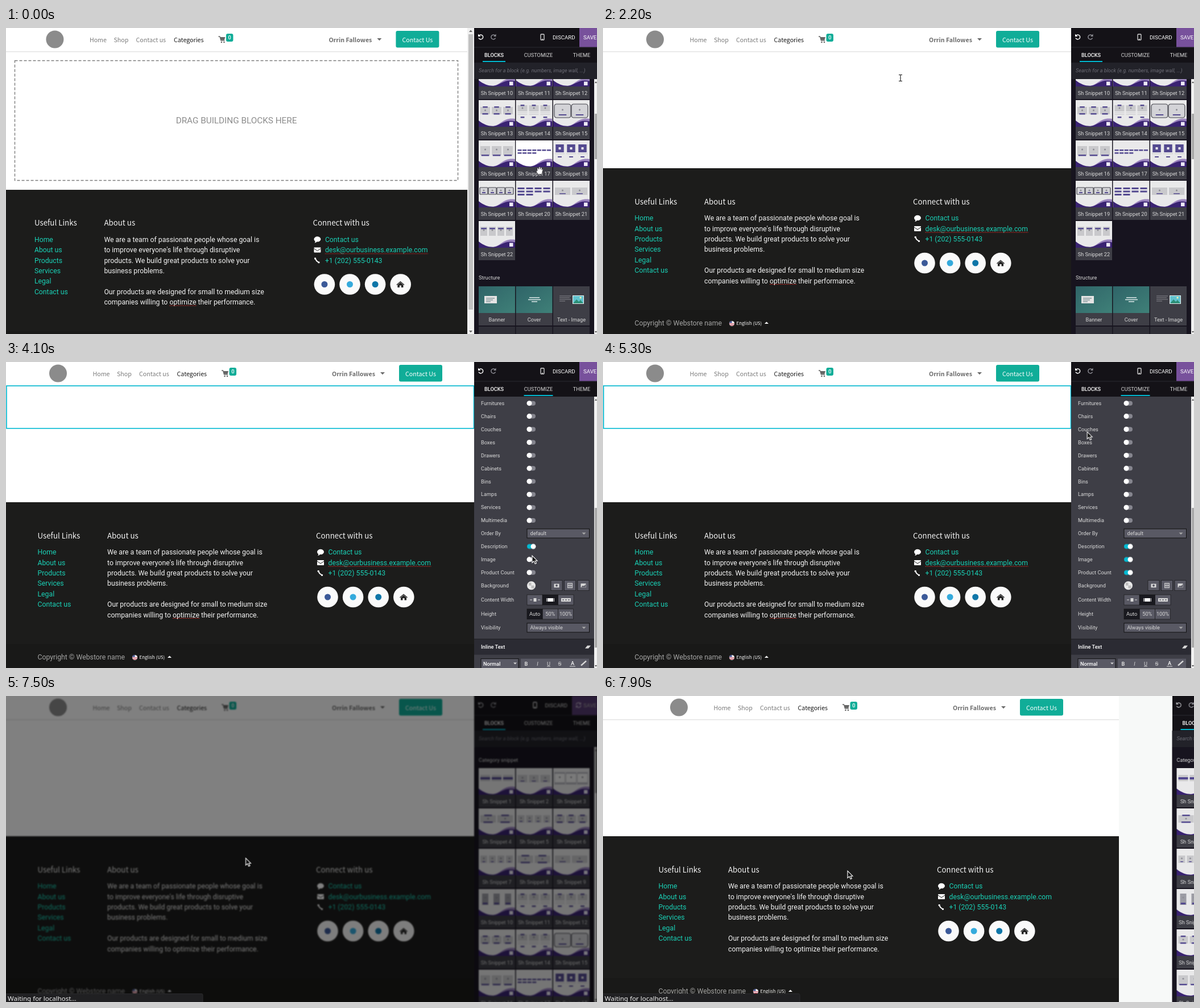
Animation, 1039 px wide and 539 px high, one loop 8 s. Source, as an HTML page:

```html
<!DOCTYPE html>
<html lang="en">
<head>
<meta charset="utf-8">
<title>Website builder</title>
<style>
html, body { margin: 0; width: 100%; height: 100%; overflow: hidden; background: #f7f9f8; }
svg { display: block; width: 1039px; height: 539px; font: 9.2px Roboto, sans-serif; fill: #d9d9d9; }
text { white-space: pre; }
.nav, .head, .lang { font-family: 'Noto Sans CJK SC', 'Noto Sans CJK JP', 'Noto Sans', sans-serif; }
.nav { font-size: 10.66px; fill: #7c7c7c; }
.user { font-weight: 700; fill: #6c6c6c; }
.dark { fill: #1a1a1a; }
.white { fill: #fff; }
.head { font-size: 13.3px; fill: #f4f4f4; }
.lang { font-size: 8px; font-weight: 500; fill: #fff; }
.copy { font-size: 12.26px; fill: #f4f4f4; }
.link { fill: #1ad0b6; }
.soft { fill: #a5a5a4; }
.drop { font-size: 15.3px; fill: #8c8c8c; }
.mid { text-anchor: middle; }
.end { text-anchor: end; }
.bold { font-weight: 500; fill: #fff; }
.top { font-size: 9.7px; }
.hint { font-size: 9.1px; font-style: italic; fill: #6d6d76; }
.mono { font-family: 'Noto Sans Mono', monospace; font-size: 9px; }
.unit { fill: #9a9aa2; }
.status { font: 11.5px 'Noto Sans', sans-serif; fill: #f0f0f0; }

.move { animation: 8s step-end infinite; }
#cursor { animation-name: cursor; }
#ghost { animation-name: ghost; }
#shift { animation-name: shift; }
#footer { animation-name: footer; }
#list { animation-name: list; }
#options { animation-name: options; }
#grip { animation-name: grip; }
#grip2 { animation-name: grip2; }
#panel { animation-name: panel; }
#scene { animation-name: dim; }
#spin { animation: spin 1s steps(10) infinite; }

@keyframes cursor {
  0% { transform: translate(938px, 251px); animation-timing-function: steps(2); }
  2.5%, 6.25% { transform: translate(950px, 265px); }
  7.5% { transform: translate(967px, 275px); }
  8.75% { transform: translate(930px, 300px); }
  10% { transform: translate(858px, 326px); }
  11.25% { transform: translate(907px, 312px); }
  15% { transform: translate(907px, 300px); animation-timing-function: steps(3); }
  18.75% { transform: translate(523px, 88px); }
  27.5% { transform: translate(523px, 88px); animation-timing-function: steps(7); }
  36.25% { transform: translate(1003px, 260px); }
  37.5% { transform: translate(1003px, 260px); animation-timing-function: steps(4); }
  42.5% { transform: translate(964px, 347px); }
  43.75% { transform: translate(964px, 347px); animation-timing-function: steps(4); }
  48.75% { transform: translate(921px, 328px); }
  51.25% { transform: translate(925px, 341px); animation-timing-function: steps(5); }
  57.5% { transform: translate(924px, 366px); }
  58.75% { transform: translate(924px, 366px); animation-timing-function: steps(4); }
  63.75% { transform: translate(760px, 190px); animation-timing-function: steps(5); }
  70% { transform: translate(988px, 22px); }
  71.25% { transform: translate(988px, 22px); animation-timing-function: steps(4); }
  76.25% { transform: translate(993px, 68px); }
  81.25% { transform: translate(993px, 68px); animation-timing-function: steps(9); }
  92.5% { transform: translate(421.5px, 285.5px); }
  96.25% { transform: translate(421.5px, 285.5px); animation-timing-function: steps(2); }
  98.75%, 100% { transform: translate(430px, 308px); }
}
@keyframes ghost {
  0%, 23.75%, 100% { opacity: 0; }
  15% { opacity: 1; }
  21.25% { opacity: .7; }
  22.5% { opacity: .35; }
}
@keyframes shift {
  0% { transform: translateX(-5.6px); }
  15% { transform: none; }
  97.5% { transform: translateX(15px); }
  98.75%, 100% { transform: translateX(42px); }
}
@keyframes footer { 0% { transform: translateY(37.5px); } 15%, 100% { transform: none; } }
@keyframes list { 0% { transform: translateY(-284px); } 93.75%, 100% { transform: none; } }
@keyframes options {
  0%, 37.5% { transform: none; animation-timing-function: steps(4); }
  42.5%, 100% { transform: translateY(-356.4px); }
}
@keyframes grip { 0% { transform: translateY(60px); } 93.75%, 100% { transform: none; } }
@keyframes grip2 {
  0%, 37.5% { transform: none; animation-timing-function: steps(4); }
  42.5%, 100% { transform: translateY(182px); }
}
@keyframes panel {
  0% { transform: none; }
  97.5% { transform: translateX(97px); }
  98.75%, 100% { transform: translateX(177.5px); }
}
@keyframes dim {
  0%, 96.25%, 100% { filter: none; }
  93.75% { filter: blur(1px) brightness(.5); }
}
@keyframes spin { to { transform: rotate(360deg); } }
</style>
</head>
<body>
<svg id="stage" viewBox="0 0 1039 539"></svg>
<script>
const TEAL = '#01bad2', GREEN = '#10ad98', PURPLE = '#544a90', GREY = '#c9c9cc', LINE = '#d9d9d9';

const text = (x, y, s, c = '') => `<text x="${x}" y="${y}" class="${c}">${s}</text>`;
const rect = (x, y, w, h, fill, more = '') =>
  `<rect x="${x}" y="${y}" width="${w}" height="${h}" fill="${fill}" ${more}/>`;
const disc = (x, y, r, fill) => `<circle cx="${x}" cy="${y}" r="${r}" fill="${fill}"/>`;
const path = (d, fill, more = '') => `<path d="${d}" fill="${fill}" ${more}/>`;
const line = (d, color = LINE, w = 1, more = '') =>
  path(d, 'none', `stroke="${color}" stroke-width="${w}" ${more}`);
const at = (x, y, s) => `<g transform="translate(${x} ${y})">${s}</g>`;
const move = (id, s) => `<g id="${id}" class="move">${s}</g>`;
const range = (n, fn) => Array.from({ length: n }, (_, i) => fn(i)).join('');

// Groups shown only during the given [from, to] spans, in ms.
let css = '';
function during(id, spans, s) {
  const keys = spans.map(([a, b]) => `${a / 80}%{opacity:1}${b / 80}%{opacity:0}`).join('');
  css += `@keyframes on-${id}{0%,100%{opacity:0}${keys}}#${id}{animation-name:on-${id}}`;
  return move(id, s);
}

/* ---------- web page ---------- */
function header() {
  const cart = line('M379 15h2.5l2 7h6.5', '#666', 1.3) + path('M382 16h9l-1.5 5h-6.5z', '#666') +
    disc(384.5, 25, 1.3, '#666') + disc(389, 25, 1.3, '#666');
  return rect(-60, -10, 925, 52, '#fff') + rect(-60, 41, 925, 1, '#e2e2e2') + rect(-60, 42, 925, 1, '#f4f4f4') +
    disc(91.5, 20, 15.5, '#8b8b8b') +
    text(152.5, 24.5, 'Home', 'nav') + text(195, 24.5, 'Shop', 'nav') +
    text(234, 24.5, 'Contact us', 'nav') + text(300.5, 24.5, 'Categories', 'nav dark') + cart +
    rect(392.5, 10, 12.5, 14, GREEN, 'rx="3"') + text(398.8, 20.3, '0', 'mid bold') +
    text(573, 24.5, 'Orrin Fallowes', 'nav user') + path('M658 18h8l-4 4.2z', '#6c6c6c') +
    rect(691, 5, 76, 29.5, GREEN, 'rx="3"') + text(729, 24.5, 'Contact Us', 'nav white mid');
}

function footer() {
  const row = i => 339.4 + 18.35 * i;
  const links = ['Home', 'About us', 'Products', 'Services', 'Legal', 'Contact us'];
  const about = ['We are a team of passionate people whose goal is', "to improve everyone's life through disruptive",
    'products. We build great products to solve your', 'business problems.', '',
    'Our products are designed for small to medium size', 'companies willing to optimize their performance.'];
  const contact = ['Contact us', 'desk@ourbusiness.example.com', '+1 (202) 555-0143'];
  const icons = path('M547 334.5a6 4.6 0 1 1 5 4.5q-1.5 2-4 2 1.5-1 1.2-2.7q-2.2-1.5-2.2-3.8z', '#fff') +
    rect(547, 349, 12, 9, '#fff', 'rx="1"') + line('M547 351l6 4 6-4', '#1c1c1b') +
    line('M549.5 367.5q.5 6 7 8', '#fff', 2) + line('M549 367v3M554 375.5h3', '#fff', 2.5);
  const colors = ['#3b5998', '#35aadc', '#0e76a8'];
  const house = path('M692 414.5l7-6 7 6-.8 1-6.2-5.3-6.2 5.3z', '#222') +
    path('M694 415l5-4.2 5 4.2v4.5h-3.5v-3.5h-3v3.5h-3.5z', '#222');
  const flag = disc(226.5, 520.5, 4.6, '#eee') + path('M222 519.5a4.6 4.6 0 0 1 4.5-3.6v3.6z', '#3a4a8c') +
    line('M222 521h9M223.5 523.5h6', '#c8324a', 1.2);
  return rect(-60, 247, 925, 302, '#1c1c1b') + rect(-60, 497, 925, 52, '#191918') +
    text(55.5, 310.5, 'Useful Links', 'head') + text(178, 310.5, 'About us', 'head') +
    text(545, 310.5, 'Connect with us', 'head') +
    links.map((s, i) => text(55.5, row(i), s, 'copy link')).join('') +
    about.map((s, i) => text(178, row(i), s, 'copy')).join('') +
    contact.map((s, i) => text(566.5, row(i), s, 'copy link')).join('') + icons +
    during('spell', [[0, 5700]], line('M566.5 360h181M293 451.5h47', '#c9302c', 1.2, 'stroke-dasharray="2 1"')) +
    range(4, i => disc(565.5 + 44.6 * i, 414, 18.3, '#fafafa')) +
    colors.map((c, i) => disc(565.5 + 44.6 * i, 414, 5.5, c)).join('') + house +
    text(55.5, 524, 'Copyright © Webstore name', 'copy soft') + flag +
    text(234.5, 523, 'English (US)', 'lang') + path('M284 521h7l-3.5-3.5z', '#fff');
}

function page() {
  const empty = rect(15.5, 57.5, 779, 211, 'none', 'stroke="#7d7d7d" stroke-width="1.4" stroke-dasharray="5 3"') +
    text(405, 168, 'DRAG BUILDING BLOCKS HERE', 'drop mid');
  const bar = rect(811, 0, 12, 539, '#f1f1f1') + rect(813, 11, 8, 485, '#c1c1c1') +
    path('M814 7h6l-3-3.5z', '#666') + path('M814 533h6l-3 3.5z', '#666');
  const tools = rect(391, 21, 41, 21, '#2b2b33', 'rx="2"') +
    line('M398 31.5h9M402.5 27v9M417 29h8M418.5 30v6h5v-6M420 27.5h2', '#fff', 1.2);
  return move('shift', rect(-60, 42, 925, 260, '#fff') + move('footer', footer()) + header()) +
    during('empty', [[0, 1200]], empty + bar) +
    during('section', [[2400, 5700]], rect(1, 42, 821.5, 75, 'none', `stroke="${TEAL}" stroke-width="1.6"`)) +
    during('tools', [[2400, 2700], [5000, 5300]], tools);
}

/* ---------- block list ---------- */
// One letter for the look and one digit for the number of columns.
const LOOKS = 'b3 c3 w3 d2 c4 d3 c4 d2 c2 t3 g3 g3 d3 g3 f2 k3 r7 p3 f4 m4 c2 k4'.split(' ');

function item(look, n, x, w) {
  const card = (y, h, fill = GREY) => rect(x, y, w, h, fill);
  const bar = (y, part = .6, h = 3) => rect(x + w * (1 - part) / 2, y, w * part, h, PURPLE);
  const spot = y => disc(x + w / 2, y, 1.5, '#8c8c94');
  switch (look) {
    case 'b': return card(12, 11) + bar(16, 1, 4);
    case 'c': return card(12, 13) + spot(17) + bar(22, .4, 1.5);
    case 'w': return rect(x - 1, 7, w + 2, 22, '#b9b9bf') + card(10, 15, '#f4f4f4') + spot(16);
    case 'd': return card(12, 13) + spot(18) + bar(11, .5, 2.5) + bar(23, .6, 2.5);
    case 't': return rect(x + 3, 8, w - 6, 20, '#9c9ca4') + spot(15) + bar(24, .5);
    case 'g': return card(9, 11) + spot(14) + bar(8, .4, 2.5) + card(22, 1) + card(25, 1) + bar(29, .4, 2.5);
    case 'f': return rect(x - 1, n > 2 ? 12 : 7, w + 2, n > 2 ? 12 : 24, '#d3d3d7',
      `rx="${n > 2 ? 1 : 4}" stroke="#45454d" stroke-width="1.2"`) + spot(17) + bar(n > 2 ? 20 : 25, .5, 2);
    case 'k': return card(10, 16) + spot(16) + bar(n > 3 ? 12 : 25, .8, 2.5);
    case 'r': return bar(16, 1, 2.5) + (x < 32 ? bar(21, 1, 2.5) : '');
    case 'p': return bar(7, .85, 14) + rect(x + w / 2 - 2, 12, 4, 4, '#eee') + card(23, 1) + bar(28, .4, 2);
    case 'm': return bar(12, 1) + bar(17.5, 1) + (x < 32 ? bar(23, 1) : '');
  }
}

function snippet(n, x, y, glow = '') {
  const [look, cols] = LOOKS[n - 1], step = 60 / cols;
  const art = range(+cols, i => item(look, +cols, 3 + i * step, step - (cols > 4 ? 1.5 : 3)));
  const wave = path('M26 46C40 43 44 30 64 33V47z', '#9a84bd') +
    path('M0 36C10 44 19 46.5 28 45.5S46 33 64 37.5V47H0z', '#3a2372');
  return at(x, y, rect(0, 0, 64, 47, '#e9e9ea') + glow + art + wave + rect(54, 38.5, 6.5, 6.5, '#eeeaf6') +
    rect(0, 47, 64, 22, '#3e3e46') + text(32, 61.5, 'Sh Snippet ' + n, 'mid'));
}

const column = i => 831 + 65.5 * i;

function blocks() {
  const hover = { 17: [0, 700], 20: [900, 1200] };
  const glow = n => hover[n] ? during('glow' + n, [hover[n]], rect(0, 0, 64, 47, '#fff')) : '';
  const label = (i, s) => rect(column(i), 786, 64, 22, '#3e3e46') + text(column(i) + 32, 800.8, s, 'mid');
  const lead = rect(841, 756, 22, 13, '#e4e4e4') + line('M844 760h15M844 763h12M844 766h8', '#56757a');
  const cover = line('M920 759h18M918 762.5h22M924 766h10', '#dfeaea', 1.4);
  const pair = line('M973 756h20M973 759h18M973 762h20M973 765h10', '#85858c') +
    rect(996, 755, 20, 15, '#e9f0f0') + rect(997, 756, 18, 13, '#62c3cf') +
    path('M997 769l6-7 4 4 3-3 5 6z', '#2c8f77') + disc(1010, 759, 1.6, '#fff4b0');
  return text(831, 115.5, 'Category snippet') +
    range(22, i => snippet(i + 1, column(i % 3), 127 + 71 * Math.floor(i / 3), glow(i + 1))) +
    text(831, 727.3, 'Structure') +
    range(3, i => rect(column(i), 739, 64, 47, i < 2 ? 'url(#sea)' : '#3e3e46') + rect(column(i), 810, 64, 40, '#2f2f37')) +
    lead + cover + pair + label(0, 'Banner') + label(1, 'Cover') + label(2, 'Text - Image');
}

/* ---------- options ---------- */
const select = (y, s) => rect(916, y - 8, 109.5, 16, '#595964', 'stroke="#111"') +
  text(921.5, y + 3.3, s) + path(`M1012.5 ${y - 1.5}h7l-3.5 3.5z`, '#aaa');
const number = (y, v) => rect(916, y - 8, 45.5, 16, '#2b2b33', 'stroke="#0a0a0a"') +
  text(943.5, y + 3.3, v, 'mono end') + text(947, y + 3.3, 'px', 'mono unit');
const toggle = (y, on) => rect(916, y - 4, 15, 8, on ? TEAL : '#85858e', 'rx="4"') + disc(on ? 927 : 920, y, 4.5, '#fff');
const button = (x, y, w, on) => rect(x, y - 9, w, 18, on ? '#19191f' : '#595964', 'stroke="#111" stroke-width=".6"');

function options() {
  const rowY = i => 131 + 22.93 * i;
  const names = ['Animation', 'Margin Top', 'Margin Right', 'Margin Bottom', 'Margin Left', 'Padding Top', 'Padding Right',
    'Padding Bottom', 'Padding Left', 'Box Shadow', 'Box Shadow Hov…', 'Desks', 'Components', 'Furnitures', 'Chairs',
    'Couches', 'Boxes', 'Drawers', 'Cabinets', 'Bins', 'Lamps', 'Services', 'Multimedia', 'Order By', 'Description',
    'Image', 'Product Count', 'Background'];
  const values = { 1: 0, 5: 50, 6: 0 };
  const control = i => {
    const y = rowY(i);
    if (i === 23) return select(y, 'default');
    if (i === 0 || i === 9 || i === 10) return select(y, 'None');
    if (i < 9) return number(y, values[i] ?? '');
    return i < 27 ? toggle(y) : '';
  };
  const bar = (y, h) => rect(823, y, 211, h, '#2b2b33') + rect(823, y - 1, 211, 1, '#17171c');
  const tools = line('M937 106l3-3M941 104l3-3M938 103l4 3', LINE, 1.6) +
    line('M955.5 101h6.5l1.5 1.5v6h-8zM957.5 101v2.5h3.5M957.5 108v-2.5h4', LINE) +
    rect(974.5, 100, 5.5, 9.5, 'none', `stroke="${LINE}" rx="1"`) +
    line('M993 100h6v6h-6zM995.5 108.5h6v-6', '#aaa') + line('M1013.5 102h8M1016 100.5h3', LINE, 1.2) +
    path('M1014.5 103.5h6v6h-6z', LINE);
  const by = rowY(27), cw = 775.4, ht = 800.4, tb = 887;
  const back = disc(923.5, by, 7.5, '#e9e9e9') + path(`M919 ${by - 5}h4.5v5h5v5h-5v-5h-4.5z`, '#bdbdbd') +
    [968, 991.5, 1015].map(x => button(x - 10, by, 20)).join('') +
    rect(963.5, by - 3, 9, 6.5, LINE) + disc(968, by, 2, '#595964') +
    rect(987.5, by - 4, 8, 8, 'none', `stroke="${LINE}"`) + line(`M990 ${by - 4}v8M993 ${by - 4}v8M987 ${by}h8`) +
    rect(1010.5, by - 3.5, 9, 7, LINE) + path(`M1011 ${by + 3}l3-3 2 1 3-3v5z`, '#595964');
  const width = [916, 943, 970.5].map((x, i) => button(x, cw, 27.5, i === 1)).join('') +
    rect(927.5, cw - 3, 5, 6, LINE) + line(`M921 ${cw}h4M935 ${cw}h4`) +
    rect(952, cw - 3, 10, 6, '#fff') + line(`M950.5 ${cw - 3}v6M963.5 ${cw - 3}v6`) +
    rect(976, cw - 3, 17, 6, LINE) + line(`M978 ${cw}h13`, '#595964', 1.4, 'stroke-dasharray="3 2"');
  const height = ['Auto', '50%', '100%'].map((s, i) =>
    button(916 + 27.2 * i, ht, 27.2, !i) + text(929.6 + 27.2 * i, ht + 3.3, s, 'mid')).join('');
  const format = rect(835, tb - 8, 66, 20, '#595964', 'stroke="#111"') + text(839, tb + 4, 'Normal', 'bold') +
    path(`M892 ${tb - 1}h6l-3 3z`, LINE) + rect(905, tb - 8, 120, 20, '#595964') +
    text(914.5, tb + 4, '<tspan font-weight="700">B</tspan>', 'mid') +
    text(934.5, tb + 4, '<tspan font-style="italic">I</tspan>', 'mid') +
    text(954, tb + 4, '<tspan text-decoration="underline">U</tspan>', 'mid') +
    text(973.5, tb + 4, '<tspan text-decoration="line-through">S</tspan>', 'mid') +
    text(996, tb + 3, 'A', 'mid bold') + line(`M991 ${tb + 5.5}h10`) + line(`M1011 ${tb + 4}l9-8`, LINE, 2.5);
  const switched = (i, ms) => during('opt' + i, [[ms, 8000]], rect(915, rowY(i) - 5, 17, 10, '#3e3e46') + toggle(rowY(i), true));
  return bar(40, 38) + text(835, 69.5, 'Page Options', 'bold') + rect(823, 78, 211, 1, '#17171c') +
    bar(91, 27) + text(835, 107.8, 'Sh Snippet 20', 'bold') + tools +
    names.map((s, i) => text(835, rowY(i) + 3.3, s) + control(i)).join('') +
    switched(24, 4100) + switched(25, 4300) + switched(26, 4500) + back +
    text(835, cw + 3.3, 'Content Width') + width + text(835, ht + 3.3, 'Height') + height +
    text(835, 827.7, 'Visibility') + select(824.4, 'Always visible') +
    bar(845, 27) + text(835, 861.7, 'Inline Text', 'bold') +
    path('M1018 861l4-5h6l-4 5z', LINE) + format;
}

/* ---------- side panel ---------- */
function panel() {
  const undo = c => line('M831.5 13.5a4 4 0 1 1-.5 4', c, 1.4) + path('M830 10.5v4.5h4.5z', c);
  const redo = line('M860 13.5a4 4 0 1 0 .5 4', '#8d8d94', 1.4) + path('M861.5 10.5v4.5h-4.5z', '#8d8d94');
  const phone = x => rect(x - 3, 11, 6, 10, 'none', `stroke="${LINE}" stroke-width="1.3" rx="1"`) + line(`M${x - 1} 19.5h2`);
  const idle = undo('#fff') + phone(943) + text(961, 20, 'DISCARD', 'top white') +
    rect(1008, 0, 32, 33.5, '#78519c') + text(1015, 20, 'SAVE', 'top white');
  const busy = undo('#a5a5aa') + phone(930) + text(947.5, 20, 'DISCARD', 'top') +
    rect(995, 0, 45, 33.5, '#55396f') + text(1015, 20, 'SAVE', 'top soft') +
    at(1006.5, 16, `<g id="spin">${line('M-4-.5a4 4 0 0 1 7-2.5M4 .5a4 4 0 0 1-7 2.5', '#b9aec4', 1.4)}` +
      path('M4.5-5v4h-4zM-4.5 5v-4h4z', '#b9aec4') + '</g>');
  const track = (y, id, from, h) => rect(1034, y, 5, 539 - y, '#f1f1f1') +
    move(id, rect(1035, from, 4, h, '#a9a9a9')) + path(`M1035 ${y + 7}h4l-2-3z`, '#555') + path('M1035 534h4l-2 3z', '#555');
  const list = rect(823, 61, 216, 488, '#17141f') +
    `<g clip-path="url(#below)">${move('list', blocks())}</g>` +
    rect(823, 61, 216, 29, '#222229') + text(831, 78, 'Search for a block (e.g. numbers, image wall, ...)', 'hint') +
    track(90, 'grip', 91, 80) + rect(838, 58, 40, 2, TEAL);
  const custom = rect(823, 61, 216, 478, '#3e3e46') +
    `<g clip-path="url(#under)">${move('options', options())}</g>` +
    track(61, 'grip2', 75, 246) + rect(910.5, 58, 51, 2, TEAL);
  return move('panel', rect(823, -10, 240, 559, '#141217') + rect(823, 33.5, 240, 1, '#2b2b33') + redo +
    during('idle', [[0, 5700]], idle) + during('busy', [[5700, 8000]], busy) +
    during('blocks', [[0, 2400], [5700, 8000]], list) + during('custom', [[2400, 5700]], custom) +
    text(858, 50.5, 'BLOCKS', 'mid bold') + text(936, 50.5, 'CUSTOMIZE', 'mid') + text(1012, 50.5, 'THEME', 'mid'));
}

function cursor() {
  const hand = path('M-3 6.5L-6 1q0-1.5 2 0L-4-4q1-1.5 2 0l.5 2L-1-6q1-1 2 0l.3 4L2-5q1-1 2 0v4l1-2q1.5 0 1 1.5L4.5 4 3.5 6.5z',
    '#fff', 'stroke="#222" stroke-width=".6"');
  const beam = 'M-3-5.5h2.5L0-5l.5-.5H3M0-5V5M-3 5.5h2.5L0 5l.5.5H3';
  const arrow = path('M0 0V12.5L3 9.8L5.2 14.5L7.4 13.5L5.3 9.2H9z', '#151515', 'stroke="#fff" stroke-width="1.1"');
  return move('cursor', move('ghost', snippet(20, 0, 4)) + during('hand', [[0, 2200]], hand) +
    during('beam', [[2200, 2400]], line(beam, '#fff', 2.5) + line(beam, '#111', 1.1)) +
    during('arrow', [[2400, 8000]], arrow));
}

const defs = `<defs><clipPath id="below"><rect x="823" y="90" width="211" height="459"/></clipPath>
<clipPath id="under"><rect x="823" y="61" width="211" height="478"/></clipPath>
<linearGradient id="sea" x2="1" y2="1"><stop stop-color="#2f6468"/><stop offset="1" stop-color="#3f8078"/></linearGradient></defs>`;
const status = rect(-2, 524.5, 348, 17, '#202022', 'rx="2" stroke="#2b2b2d"') + text(3, 536.5, 'Waiting for localhost…', 'status');

const art = defs + move('scene', rect(-10, -10, 1059, 559, '#f7f9f8') + page() + panel()) +
  during('status', [[5800, 8000]], status) + cursor();
const sheet = document.createElement('style');
sheet.textContent = css;
document.head.append(sheet);
document.getElementById('stage').innerHTML = art;
</script>
</body>
</html>
```
